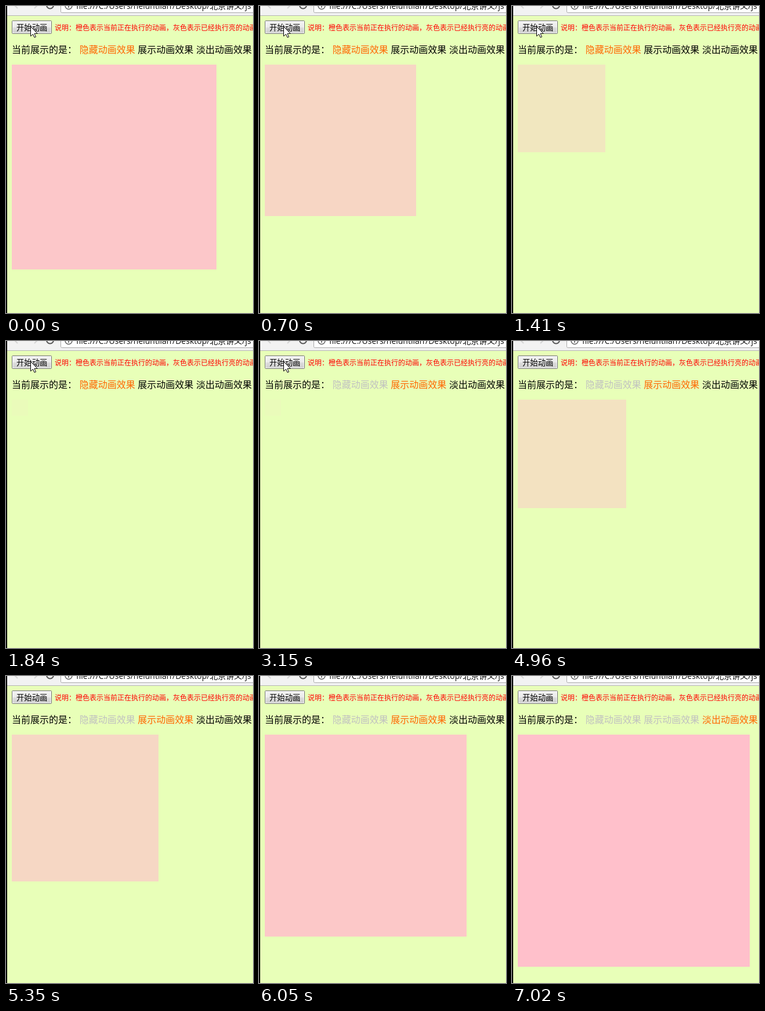
Animation of 426x529 px, one loop 7420 ms. Source, as an HTML page:

```html
<!DOCTYPE html>
<html lang="zh-CN">
<head>
<meta charset="utf-8">
<style>
html, body { margin: 0; height: 100%; overflow: hidden; background: #e8ffb8 }
svg { display: block; font: 16px "Noto Sans CJK SC", "Noto Sans CJK", sans-serif; white-space: pre }
.url { font: 14px "Open Sans", "Noto Sans CJK SC", sans-serif; fill: #111 }
</style>
</head>
<body>
<svg width="426" height="529" viewBox="0 0 426 529">
  <defs>
    <linearGradient id="face" x2="0" y2="1">
      <stop stop-color="#f3f3f3"/><stop offset=".5" stop-color="#ebebeb"/>
      <stop offset=".5" stop-color="#dddddd"/><stop offset="1" stop-color="#cfcfcf"/>
    </linearGradient>
  </defs>

  <!-- browser bar -->
  <rect width="426" height="16" fill="#f2f2f2"/>
  <rect y="16" width="426" height="1" fill="#b6b4b6"/>
  <rect x="94.5" y="-20.5" width="350" height="32" rx="2" fill="#fff" stroke="#a8a8a8"/>
  <g fill="none" stroke="#5a5a5a">
    <path d="M14 -2L20 4M55 -2L49 4" stroke="#d5d5d5" stroke-width="2"/>
    <circle cx="76" cy="-1.5" r="6" stroke-width="2"/>
    <circle cx="108" cy="-.5" r="6" stroke-width="1.4"/>
    <path d="M108 -2V3" stroke-width="1.6"/>
  </g>
  <g class="url">
    <text x="121" y="5">file:///C:/Users/heluntilan</text>
    <text x="287" y="5">/Desktop/北京讲义/js</text>
  </g>

  <!-- page -->
  <rect width="2" height="529" fill="#000"/>
  <rect x="10.5" y="25.5" width="68" height="22" rx="1" fill="url(#face)" stroke="#707070"/>
  <rect x="11.5" y="26.5" width="66" height="20" fill="none" stroke="#fff" stroke-opacity=".75"/>
  <text x="18" y="41.5" font-size="13.333">开始动画</text>
  <text x="84" y="42" font-size="12" fill="#f00">说明：橙色表示当前正在执行的动画，灰色表示已经执行亮的动画</text>
  <text x="10" y="81">当前展示的是：</text>
  <text class="label" x="126.7" y="81">隐藏动画效果</text>
  <text class="label" x="227.2" y="81">展示动画效果</text>
  <text class="label" x="327.9" y="81">淡出动画效果</text>
  <rect id="box" x="10" y="101" fill="#ffc0cb"/>
  <path id="cursor" d="M0 0V16.5L4 13L6.5 18.7L9 17.7L6.5 12H11.7Z" fill="#fff" stroke="#000"/>
</svg>
<script>
const LOOP = 7420, FULL = 400;
const HIDDEN = 1840, SHOW = 3150, GROW = 4380, FADE = 7020;
const REST = 28;        // faint remainder while the box is hidden
const ADVANCE = 0.0356; // easing progress per screen step

const box = document.getElementById('box');
const cursor = document.getElementById('cursor');
const labels = document.querySelectorAll('.label');

const swing = p => 0.5 - Math.cos(Math.PI * Math.min(p, 1)) / 2;
const growStep = t => Math.max(-1, Math.floor((t - GROW) / 138));

function boxSide(t) {
  if (t < HIDDEN) return FULL * (1 - swing(0.223 + ADVANCE * Math.floor(t / 140)));
  if (t < GROW) return REST;
  return FULL * swing(0.3368 + ADVANCE * growStep(t));
}

function draw(t) {
  const side = Math.round(boxSide(t));
  box.setAttribute('width', side);
  box.setAttribute('height', side);
  box.setAttribute('opacity', side / FULL);

  // the pointer leaves upwards as the box starts to grow
  const k = growStep(t);
  cursor.setAttribute('transform', `translate(${45.5 + 3 * k} ${35.5 - 32 * Math.max(0, k)})`);

  const active = (t >= SHOW) + (t >= FADE);
  labels.forEach((el, i) =>
    el.setAttribute('fill', i < active ? '#c0c0c0' : i === active ? '#ff6600' : '#000'));
}

let start;
function tick(now) {
  start ??= now;
  draw(Math.max(0, now - start) % LOOP);
  requestAnimationFrame(tick);
}
draw(0);
requestAnimationFrame(tick);
</script>
</body>
</html>
```
